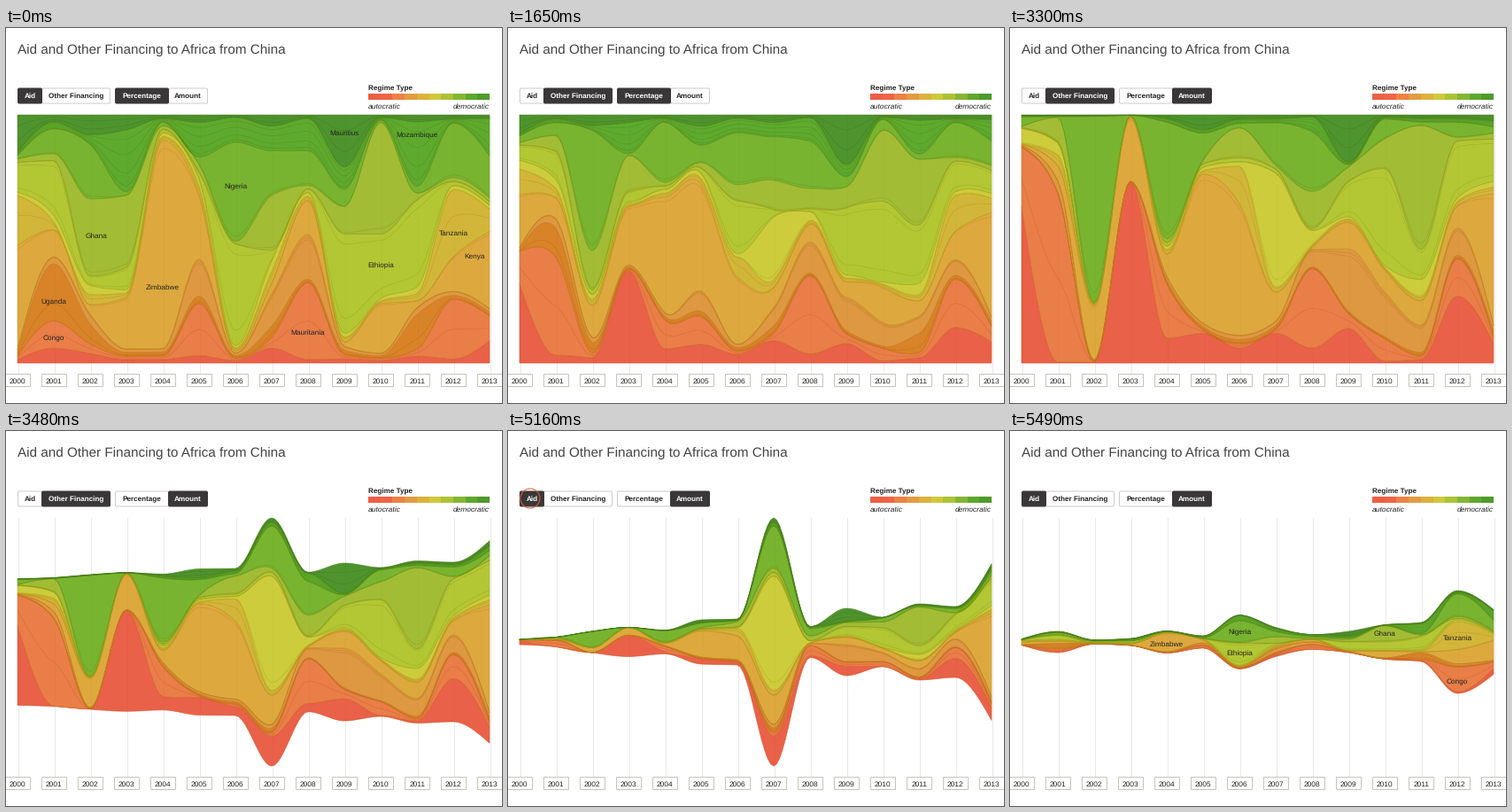
Recreate the animation shown at these times as a matplotlib script. Size 560 by 423 pixels, loop 6.99 s.

```python
import matplotlib.pyplot as plt
import numpy as np
from matplotlib.animation import FuncAnimation
from matplotlib.collections import LineCollection, PolyCollection
from matplotlib.patches import Circle, FancyBboxPatch, Rectangle

W, H, DPI = 560, 423, 100
PX = 72 / DPI
TOP, BASE, MID = 98, 378, 238
YEARS = 14
YEAR_X = 13 + 41 * np.arange(YEARS)
STEPS = 12
DARK, INK, RIM = "#3a3738", "#222222", "#cccccc"

plt.rcParams["font.family"] = "Liberation Sans"
plt.rcParams["text.hinting"] = "none"
fig = plt.figure(figsize=(W / DPI, H / DPI), dpi=DPI, facecolor="white")
ax = fig.add_axes([0, 0, 1, 1])
ax.set_xlim(0, W)
ax.set_ylim(H, 0)
ax.axis("off")


def text(x, y, s, size=8.3, color=INK, ha="center", **kw):
    return ax.text(x, y, s, fontsize=size * PX, color=color, ha=ha,
                   va="baseline", zorder=6, **kw)


# ---- bands from autocratic to democratic ----
# Each: colour, inner threads, then the notable percentages of aid and of
# other financing, keyed by years since 2000. What a year leaves over is
# split evenly between the bands not listed for it.
BANDS = (
    ("#ea6148", (), {1: 6, 7: 6, 13: 9},
     {0: 63, 3: 73, 4: 10, 5: 12, 6: 6, 7: 12, 8: 6, 9: 14, 12: 27, 13: 8}),
    ("#ea7e49", (0.5,), {1: 11, 5: 21, 8: 31, 12: 24, 13: 10},
     {0: 24, 1: 68, 4: 22, 8: 32, 9: 6, 10: 9, 12: 15}),
    ("#d98328", (0.3,), {1: 23, 2: 8, 11: 14}, {}),
    ("#df9842", (0.88, 0.94), {5: 15, 7: 13, 8: 18},
     {1: 5, 8: 7, 9: 25, 10: 18, 11: 11, 12: 11}),
    ("#dda93e", (0.96,),
     {0: 42, 1: 11, 3: 21, 4: 84, 5: 26, 8: 14, 10: 20, 12: 14, 13: 31},
     {1: 6, 2: 22, 3: 26, 4: 9, 5: 60, 6: 53, 7: 12, 9: 11, 10: 9, 11: 10,
      12: 9, 13: 53}),
    ("#d3b63a", (0.6,), {0: 20, 12: 27, 13: 9}, {1: 4, 6: 15}),
    ("#cecc3c", (0.07,), {}, {0: 6, 1: 5, 7: 46, 8: 6, 11: 7}),
    ("#b3c734", (0.15, 0.9),
     {0: 12, 1: 22, 3: 9, 6: 41, 9: 40, 10: 26, 11: 35},
     {9: 14, 10: 39, 11: 12, 12: 23, 13: 17}),
    ("#a2bd35", (0.05,), {2: 31, 3: 29, 7: 22, 9: 11, 10: 45},
     {1: 10, 6: 12, 8: 15, 9: 6, 10: 12, 11: 50}),
    ("#78b430", (0.05,),
     {1: 10, 2: 22, 6: 40, 7: 18, 8: 14, 9: 7, 12: 22, 13: 17},
     {0: 4, 2: 75, 4: 47, 5: 11, 7: 17, 8: 24, 10: 8, 12: 6}),
    ("#5eaa2e", (0.1, 0.3, 0.6, 0.85),
     {3: 25, 5: 14, 6: 10, 7: 10, 8: 13, 9: 9, 11: 26, 13: 15}, {8: 6}),
    ("#4e942e", (0.3, 0.7), {0: 15, 2: 8, 3: 6, 9: 21}, {5: 6, 9: 19}),
)
AID_TOTAL = [7, 24, 5, 8, 25, 14, 61, 33, 17, 24, 39, 44, 116, 73]
OTHER_TOTAL = [6, 11, 24, 33, 27, 50, 52, 280, 35, 76, 56, 86, 80, 177]


def smooth(y):
    """Monotone cubic, flat at every turning point."""
    d = np.diff(y)
    pull = np.minimum(np.minimum(abs(d[:-1]), abs(d[1:])),
                      abs(d[:-1] + d[1:]) / 4)
    inner = (np.sign(d[:-1]) + np.sign(d[1:])) * pull
    m = np.concatenate(([(3 * d[0] - inner[0]) / 2], inner,
                        [(3 * d[-1] - inner[-1]) / 2]))
    t = np.arange(STEPS) / STEPS
    a, b, p, q = (v[:, None] for v in (y[:-1], y[1:], m[:-1], m[1:]))
    curve = (a + (b - a) * t * t * (3 - 2 * t)
             + p * t * (1 - t) ** 2 - q * t * t * (1 - t))
    return np.append(curve.ravel(), y[-1])


def edges(column, total=BASE - TOP):
    """Curves of all band edges, bottom to top."""
    share = np.array([[band[column].get(k, np.nan) for k in range(YEARS)]
                      for band in BANDS])
    rest = (100 - np.nansum(share, axis=0)) / np.isnan(share).sum(axis=0)
    share = np.where(np.isnan(share), rest, share)
    level = np.vstack((np.zeros(YEARS), np.cumsum(share, axis=0))) / 100
    return np.array([smooth(r) for r in MID + (0.5 - level) * total])


CURVE_X = np.linspace(YEAR_X[0], YEAR_X[-1], (YEARS - 1) * STEPS + 1)
AID, OTHER = 2, 3
STAGES = (edges(AID), edges(OTHER), edges(OTHER, np.array(OTHER_TOTAL)),
          edges(AID, np.array(AID_TOTAL)))
STARTS = (0, 50, 110, 172)
ENDS = (0, 60, 122, 183)

# ---- header ----
text(13, 28.5, "Aid and Other Financing to Africa from China", 15.2,
     "#444444", ha="left")


def box(x0, y0, x1, y1, edge, r=1.5, **kw):
    return ax.add_patch(FancyBboxPatch(
        (x0, y0), x1 - x0, y1 - y0, facecolor="white", edgecolor=edge,
        linewidth=PX, boxstyle=f"round,pad=0,rounding_size={r}", **kw))


buttons = []
for x0, x1, name in ((13.5, 40.5, "Aid"), (40.5, 117.5, "Other Financing"),
                     (123.5, 183.5, "Percentage"), (183.5, 227.5, "Amount")):
    label = text((x0 + x1) / 2, 79.2, name, 8.2, weight="bold")
    buttons.append((box(x0, 68, x1, 85, RIM), label))
ring = ax.add_patch(Circle((25, 76), 11, fill=False, edgecolor="#e0603c",
                           linewidth=1.2 * PX, zorder=7))

text(409, 70.6, "Regime Type", 8.2, weight="bold", ha="left")
text(409, 90.8, "autocratic", 8.5, style="italic", ha="left")
text(546, 90.8, "democratic", 8.4, style="italic", ha="right")
LEGEND = ("#ec5f45", "#ee6447", "#ec8246", "#e29b43", "#dcb13e",
          "#cfc83c", "#acc336", "#84b634", "#5ea72e", "#4f9a2c")
for i, c in enumerate(LEGEND):
    ax.add_patch(Rectangle((409 + 13.7 * i, 74), 13.8, 7, facecolor=c,
                           linewidth=0))

# ---- axis ----
for i, x in enumerate(YEAR_X):
    ax.plot([x + 0.5] * 2, [98, 391], color="#e9e9e9", linewidth=PX,
            zorder=1)
    box(x - 13.5, 390.5, x + 14.5, 404.5, "#c4c6bd", 0.5, zorder=5)
    text(x + 0.3, 400.7, str(2000 + i), 8.4)

# ---- streams ----
OPACITY = 0.85
tint = np.array([[int(b[0][i:i + 2], 16) / 255 for i in (1, 3, 5)]
                 for b in BANDS])
fill = np.clip((tint - (1 - OPACITY)) / OPACITY, 0, 1)
shade = tint * (0.88, 0.82, 0.5)


def with_alpha(rgb, alpha):
    return np.column_stack((rgb, np.full(len(rgb), alpha)))


areas = ax.add_collection(PolyCollection(
    [], facecolors=with_alpha(fill, OPACITY),
    edgecolors=with_alpha(shade, 0.6), linewidths=0.8 * PX, zorder=2))
cuts = [(k, f) for k, band in enumerate(BANDS) for f in band[1]]
threads = ax.add_collection(LineCollection(
    [], colors=with_alpha(shade[[k for k, _ in cuts]], 0.5),
    linewidths=0.8 * PX, zorder=3))

LABELS = (
    (("Ghana", 102, 234), ("Nigeria", 259, 179), ("Mauritius", 382, 118),
     ("Mozambique", 464, 121), ("Tanzania", 505, 231), ("Kenya", 529, 258),
     ("Ethiopia", 423, 268), ("Mauritania", 341, 343),
     ("Zimbabwe", 177, 292), ("Uganda", 54, 309), ("Congo", 54, 350)),
    (("Nigeria", 95, 152), ("Côte d'Ivoire", 181, 159),
     ("Mauritius", 382, 111), ("Ghana", 464, 172), ("Zambia", 423, 206),
     ("Congo (Dem. Rep.)", 300, 213), ("Kenya", 532, 206),
     ("Angola", 218, 261), ("Cameroon", 382, 285), ("Congo", 54, 302),
     ("Sudan", 136, 336)),
    (("Nigeria", 95, 234), ("Angola", 218, 240),
     ("Congo (Dem. Rep.)", 300, 227), ("Cameroon", 389, 254),
     ("Ghana", 464, 216), ("Kenya", 532, 227), ("Sudan", 300, 350)),
    (("Zimbabwe", 177, 240), ("Nigeria", 259, 227), ("Ethiopia", 259, 251),
     ("Ghana", 423, 228), ("Tanzania", 505, 233), ("Congo", 505, 283)),
)
names = [[text(x, y + 2.5, s) for s, x, y in group] for group in LABELS]


def ease(u):
    return 4 * u ** 3 if u < 0.5 else 1 - 4 * (1 - u) ** 3


def update(frame):
    k = max(i for i, s in enumerate(STARTS) if frame >= s)
    u = min(1.0, (frame - STARTS[k]) / (ENDS[k] - STARTS[k])) if k else 1.0
    e = ease(u)
    rows = STAGES[k - 1] * (1 - e) + STAGES[k] * e

    areas.set_verts([
        np.column_stack((np.append(CURVE_X, CURVE_X[::-1]),
                         np.append(hi, lo[::-1])))
        for lo, hi in zip(rows[:-1], rows[1:])])
    threads.set_segments([
        np.column_stack((CURVE_X, rows[j] * (1 - f) + rows[j + 1] * f))
        for j, f in cuts])

    for i, group in enumerate(names):
        for t in group:
            t.set_visible(i == k and u >= 1)

    aid, share = k in (0, 3), k < 2
    for (patch, label), on in zip(buttons, (aid, not aid, share, not share)):
        patch.set_facecolor(DARK if on else "white")
        patch.set_edgecolor(DARK if on else RIM)
        patch.set_zorder(3 if on else 2)
        label.set_color("white" if on else INK)

    age = frame - STARTS[3]
    ring.set_visible(0 <= age < 4)
    ring.set_alpha(0.85 - 0.2 * min(max(age, 0), 4))
    return []


anim = FuncAnimation(fig, update, frames=233, interval=30, repeat=True,
                     repeat_delay=0, blit=False)
plt.show()
```
